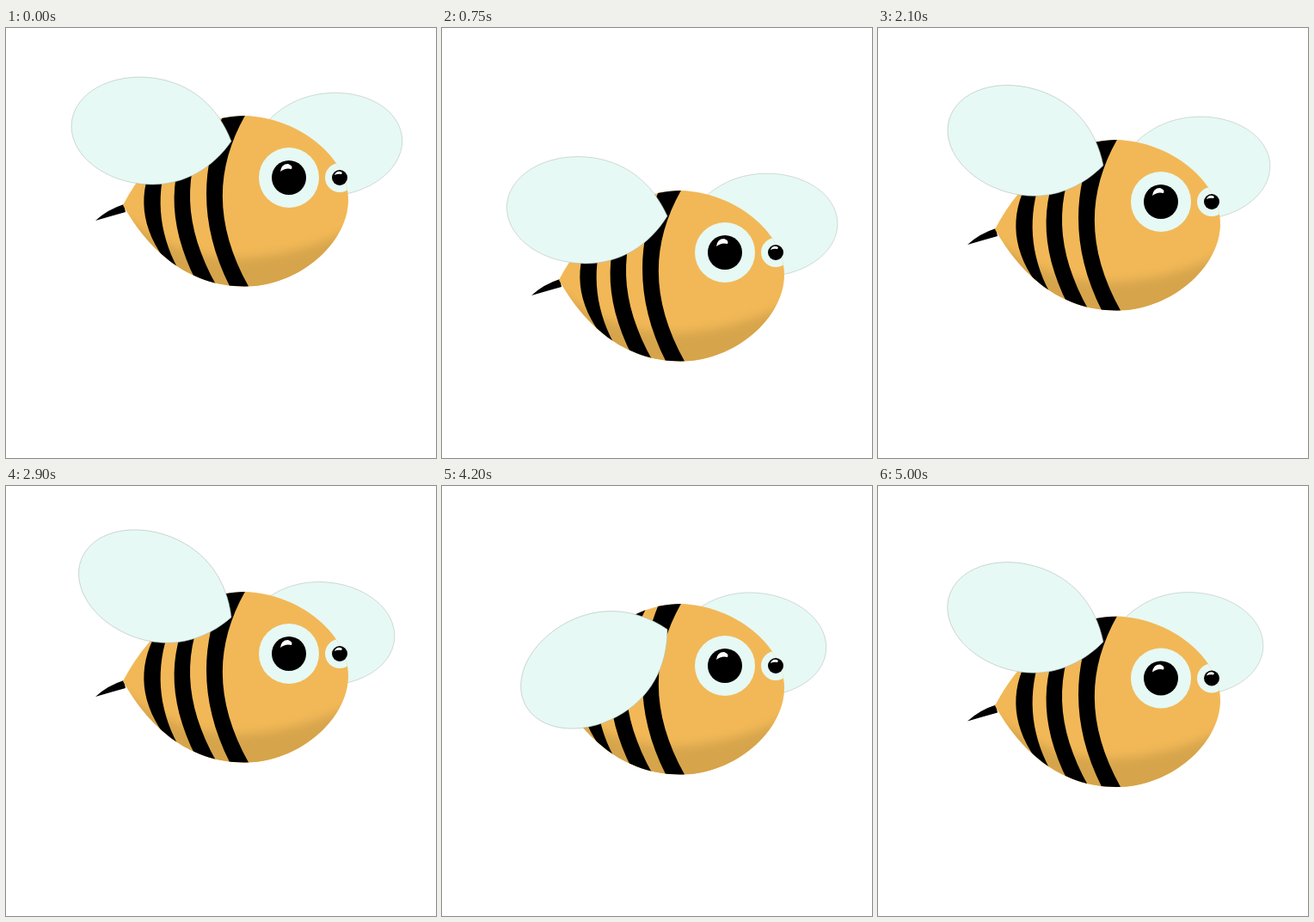
Write an HTML page that moves like this. It is 500 px wide and 500 px high and loops after 5050 ms.

```html
<!DOCTYPE html>
<html lang="en">
<head>
<meta charset="utf-8">
<title>Flying bee</title>
<style>
  html, body { margin: 0; width: 100%; height: 100%; overflow: hidden; background: #fff; }
  svg { display: block; width: 100vw; height: 100vh; }
  .wing { fill: #e6f9f4; stroke: #a9b5b1; stroke-width: .5; }
  .white { fill: #e6f9f4; }
</style>
</head>
<body>
<svg viewBox="0 0 500 500">
  <defs>
    <path id="wing" d="M0 0C-20-38-55-62-100-62A87 62 0 0 0-100 62C-55 62-20 38 0 0Z"/>
    <path id="torso" d="M136 206C160 160 210 102 278 102C340 104 398 150 398 200C398 250 340 300.500 278 300.500C210 300.500 165 257 136 206Z"/>
    <clipPath id="inside"><use href="#torso"/></clipPath>
    <filter id="soft" x="-20%" y="-30%" width="140%" height="160%"><feGaussianBlur stdDeviation="6"/></filter>
  </defs>
  <g id="bee">
    <use id="backWing" class="wing" href="#wing"/>
    <path d="M104 224Q118 211 137 205L139 214Q121 219 104 224Z"/>
    <use href="#torso" fill="#f2b857"/>
    <g clip-path="url(#inside)">
      <path d="M130 214Q190 266 270 268Q345 264 410 230V320H130Z" fill="#d6a44c" filter="url(#soft)"/>
      <path d="M178 145C155 180 152 225 184 268L200 280C176 235 174 190 190 145Z"/>
      <path d="M222 110C188 165 186 225 221 294L245 300C206 230 204 170 238 106Z"/>
      <path d="M253 100C226 165 224 230 262 304H284C242 230 242 165 279 100Z"/>
      <circle class="white" cx="388" cy="174" r="17"/>
    </g>
    <circle class="white" cx="329" cy="174" r="35"/>
    <circle cx="329" cy="174" r="20"/>
    <circle cx="388" cy="174" r="9"/>
    <path d="M319 167Q320 158 328 158Q334 160 332 164Q325 162 319 167Z" fill="#fff"/>
    <path d="M382 171Q384 166 389 167Q392 168 390 170Q386 169 382 171Z" fill="#fff"/>
    <use id="frontWing" class="wing" href="#wing"/>
  </g>
</svg>
<script>
  const LOOP = 5050, STEP = 50;

  // Smooth curve through [time, value] keys, flat at every peak and trough.
  function curve(keys) {
    const slope = i => (keys[i + 1][1] - keys[i][1]) / (keys[i + 1][0] - keys[i][0]);
    const last = keys.length - 1;
    const tangents = keys.map((_, i) => {
      if (i === 0) return slope(0);
      if (i === last) return slope(last - 1);
      const a = slope(i - 1), b = slope(i);
      return a * b > 0 ? 2 * a * b / (a + b) : 0;
    });
    return t => {
      let i = 0;
      while (i < last - 1 && t > keys[i + 1][0]) i++;
      const [t0, v0] = keys[i], [t1, v1] = keys[i + 1];
      const span = t1 - t0, u = (t - t0) / span, w = 1 - u;
      return w * w * ((1 + 2 * u) * v0 + u * span * tangents[i])
           + u * u * ((1 + 2 * w) * v1 - w * span * tangents[i + 1]);
    };
  }

  const bob = curve([
    [0, 0], [550, 67.5], [750, 87], [1000, 98.5], [1100, 96.5], [1500, 65.5], [1650, 51.5],
    [2100, 28], [2200, 26.2], [2900, 21], [3300, 22.5], [3850, 30.5], [4200, 35], [4400, 38.5], [5000, 49.5]
  ]);
  const frontTilt = curve([
    [0, 7], [550, 5.3], [750, 4], [1100, 1], [1500, 4.8], [1650, 9], [1850, -3], [2120, 17],
    [2350, -4], [2600, 19], [2770, 0], [2950, 26], [3180, -18], [3420, 33], [3660, -24], [3910, 37.5],
    [4180, -29], [4430, 23], [4650, -27], [4870, 24.5], [4950, 20.6], [5000, 16.4]
  ]);
  const backX = curve([[0, 377], [750, 376], [1500, 374], [2100, 372], [2900, 368], [4200, 363], [5000, 364]]);
  const backY = curve([[0, 135.5], [750, 142], [1500, 145.5], [2100, 135], [2900, 150.5], [4200, 149], [5000, 134]]);
  const backTilt = curve([[0, 6], [750, 2], [1500, 0], [2100, 3], [2900, -4], [4200, -5], [5000, -3]]);

  const [bee, frontWing, backWing] = ['bee', 'frontWing', 'backWing'].map(id => document.getElementById(id));
  const place = (el, transform) => el.setAttribute('transform', transform);

  function draw(t) {
    place(bee, `translate(0 ${bob(t)})`);
    place(frontWing, `translate(262 131.7) rotate(${frontTilt(t)})`);
    place(backWing, `translate(${backX(t)} ${backY(t)}) rotate(${-backTilt(t)}) scale(-.965 .965) translate(100 0)`);
  }

  const start = performance.now();
  function tick() {
    const t = (performance.now() - start) % LOOP;
    draw(Math.floor(t / STEP) * STEP);
    requestAnimationFrame(tick);
  }
  tick();
</script>
</body>
</html>
```
